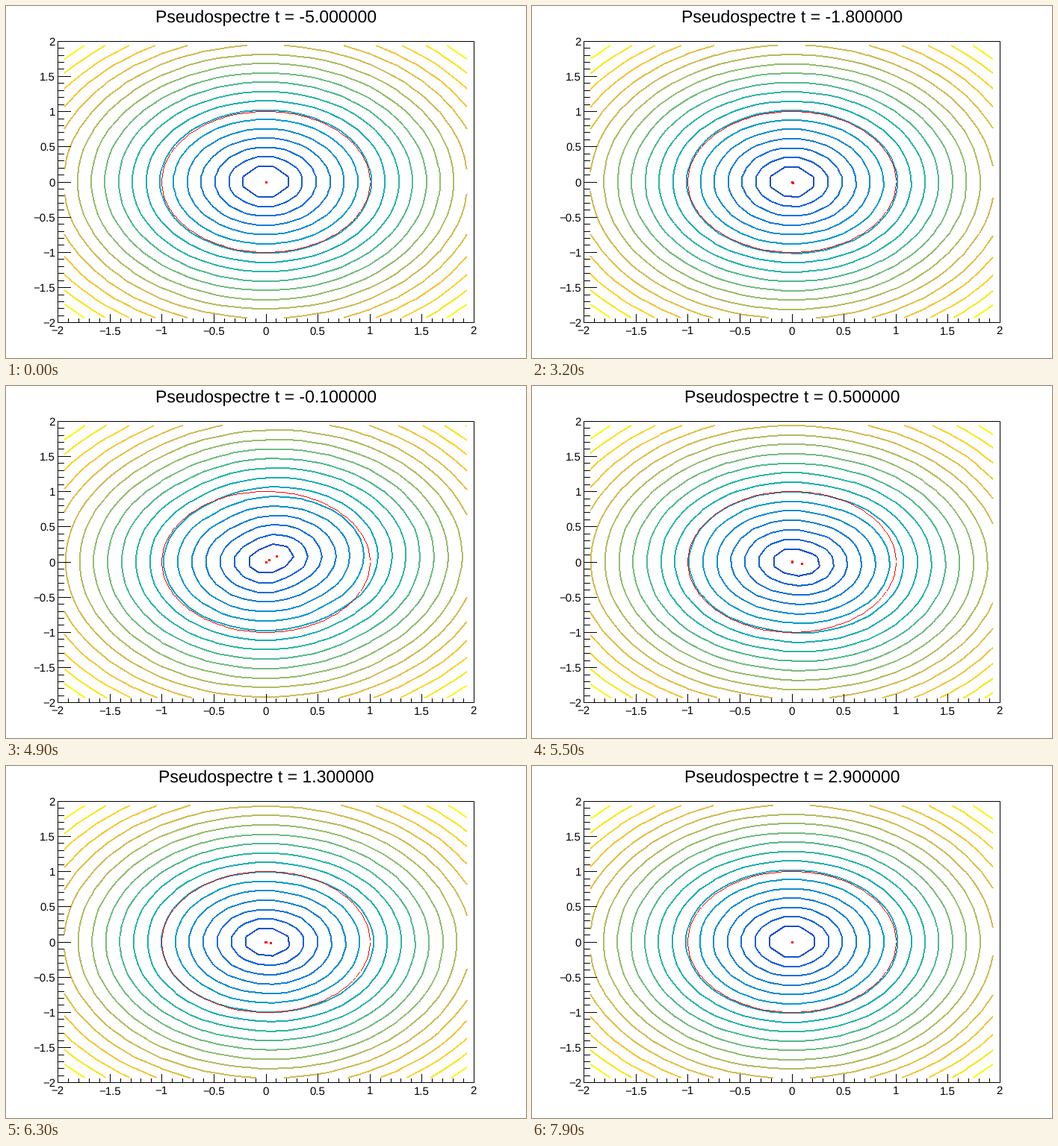
A matplotlib script that plays this animation: 696x472 px, repeating every 8 s.

```python
import numpy as np
import matplotlib.pyplot as plt
from matplotlib.animation import FuncAnimation
from matplotlib.colors import LinearSegmentedColormap

W, H, DPI = 696, 472, 80
PX = 72 / DPI  # points per pixel
FRAMES, INTERVAL = 80, 100
LEVELS, BINS = 20, 30

plt.rcParams.update({"font.family": "Liberation Sans", "text.hinting": "none"})

BIRD = LinearSegmentedColormap.from_list("bird", list(zip(
    [0.2082, 0.0592, 0.0780, 0.0232, 0.1802, 0.5301, 0.8186, 0.9956, 0.9764],
    [0.1664, 0.3599, 0.5041, 0.6419, 0.7178, 0.7492, 0.7328, 0.7862, 0.9832],
    [0.5293, 0.8684, 0.8385, 0.7914, 0.6425, 0.4662, 0.3499, 0.1968, 0.0539])), N=255)
COLORS = [BIRD(int((k + 0.99) * 255 / LEVELS), bytes=True)[:3]
          for k in range(1, LEVELS)]

TIMES = np.add.accumulate([-5.0] + [0.1] * (FRAMES - 1))

# Paths of the two moving eigenvalues; the third stays at zero
KEYS = np.array([-5, -3.4, -2, -0.8, -0.1, 0.5, 1.3, 2.9])
OUTER = np.array([0, .004 + .003j, .008 - .004j, .018 - .016j,
                  .1 + .08j, .09 - .025j, .045 - .012j, .002])
INNER = np.array([0, -.003 - .004j, .002 - .003j, .006 - .006j,
                  .032 + .027j, -.001 + .006j, -.010, 0])


def sx(x):
    return 348 + 139.2 * x


def sy(y):
    return 236 - 94.4 * y


def hermite(t, values):
    """Smooth curve through the key values."""
    slopes = np.gradient(values, KEYS)
    k = int(np.clip(np.searchsorted(KEYS, t) - 1, 0, len(KEYS) - 2))
    h = KEYS[k + 1] - KEYS[k]
    u = np.clip((t - KEYS[k]) / h, 0, 1)
    return ((1 + 2 * u) * (1 - u) ** 2 * values[k]
            + u * (1 - u) ** 2 * h * slopes[k]
            + u * u * (3 - 2 * u) * values[k + 1]
            + u * u * (u - 1) * h * slopes[k + 1])


def stroke(img, points, color, width):
    """Draw a polyline with hard pixel edges; vertices fall on whole pixels."""
    pts = np.floor(points).astype(int)
    p, q = pts[:-1], pts[1:]
    steep = np.abs(q - p)[:, 1] > np.abs(q - p)[:, 0]
    p = np.where(steep[:, None], p[:, ::-1], p)
    q = np.where(steep[:, None], q[:, ::-1], q)
    back = (p[:, 0] > q[:, 0])[:, None]
    p, q = np.where(back, q, p), np.where(back, p, q)

    run = q[:, 0] - p[:, 0]
    slope = (q[:, 1] - p[:, 1]) / np.maximum(run, 1)
    seg = np.repeat(np.arange(len(run)), run)
    step = np.arange(len(seg)) - np.repeat(np.cumsum(run) - run, run)
    u = p[seg, 0] + step
    m = slope[seg]
    if width > 1:
        mid = p[seg, 1] + (step + 0.5) * m
        reach = width / 2 * np.hypot(1, m)
    else:
        mid = p[seg, 1] + 0.5 + step * m
        reach = 0.5
    for j in (-1, 0, 1):
        v = np.floor(mid).astype(int) + j
        off = v + 0.5 - mid
        hit = (off >= -reach) & (off < reach)
        col, row = np.where(steep[seg], v, u), np.where(steep[seg], u, v)
        img[row[hit], col[hit]] = color


fig = plt.figure(figsize=(W / DPI, H / DPI), dpi=DPI, facecolor="white")
ax = fig.add_axes([0, 0, 1, 1])
ax.axis("off")


def line(x, y):
    ax.plot(x, y, color="black", lw=PX, snap=False, solid_capstyle="butt",
            solid_joinstyle="miter")


def label(v):
    return f"{v:g}".replace("-", "\u2212")


# Frame, ticks and axis labels
LEFT, RIGHT, TOP, BOTTOM = 69.5, 626.5, 47.5, 424.5
line([LEFT, RIGHT, RIGHT, LEFT, LEFT, RIGHT], [BOTTOM, BOTTOM, TOP, TOP, BOTTOM, BOTTOM])
for k in range(-20, 21):
    v = k / 10
    major = k % 5 == 0
    px, py = np.floor(sx(v)) + 0.5, np.floor(sy(v)) + 0.5
    line([px, px], [BOTTOM, BOTTOM - (11.5 if major else 5.5)])
    line([LEFT, LEFT + (17.5 if major else 8.5)], [py, py])
    if major:
        ax.text(sx(v) - 0.6, 440.5, label(v), size=15 * PX, ha="center", va="baseline")
        ax.text(66, sy(v) + 5.5, label(v), size=15 * PX, ha="right", va="baseline")

title = ax.text(348, 22, "", size=23 * PX, ha="center", va="baseline")
dots, = ax.plot([], [], "s", color="red", ms=3 * PX, mew=0, zorder=5)
picture = ax.imshow(np.full((H, W, 3), 255, np.uint8), extent=(0, W, H, 0),
                    aspect="auto", interpolation="nearest", zorder=0)

# Unit circle with a small gap at angle zero
angle = np.linspace(0.02, 2 * np.pi - 0.02, 200)
circle = np.column_stack([sx(np.cos(angle)), sy(np.sin(angle))])

centers = -2 + (np.arange(BINS) + 0.5) * 4 / BINS
grid_x, grid_y = np.meshgrid(centers, centers)
plane = grid_x + 1j * grid_y


def update(i):
    t = TIMES[i]
    eig = np.array([0, hermite(t, INNER), hermite(t, OUTER)])
    dist = np.abs(plane[..., None] - eig).min(axis=-1)
    levels = np.linspace(dist.min(), dist.max(), LEVELS + 1)[1:-1]

    # The contour set only supplies the ring vertices
    rings = ax.contour(sx(grid_x), sy(grid_y), dist, levels=levels)
    img = np.full((H, W, 3), 255, np.uint8)
    for color, parts in zip(COLORS, rings.allsegs):
        for points in parts:
            stroke(img, points, color, 2)
    rings.remove()
    stroke(img, circle, (255, 0, 0), 1)

    picture.set_data(img)
    ax.set_xlim(0, W)
    ax.set_ylim(H, 0)
    dots.set_data(sx(eig.real), sy(eig.imag))
    title.set_text(f"Pseudospectre t = {t:.6f}")
    return [picture, dots, title]


anim = FuncAnimation(fig, update, frames=FRAMES, interval=INTERVAL,
                     repeat=True, repeat_delay=0, blit=False)
plt.show()
```
